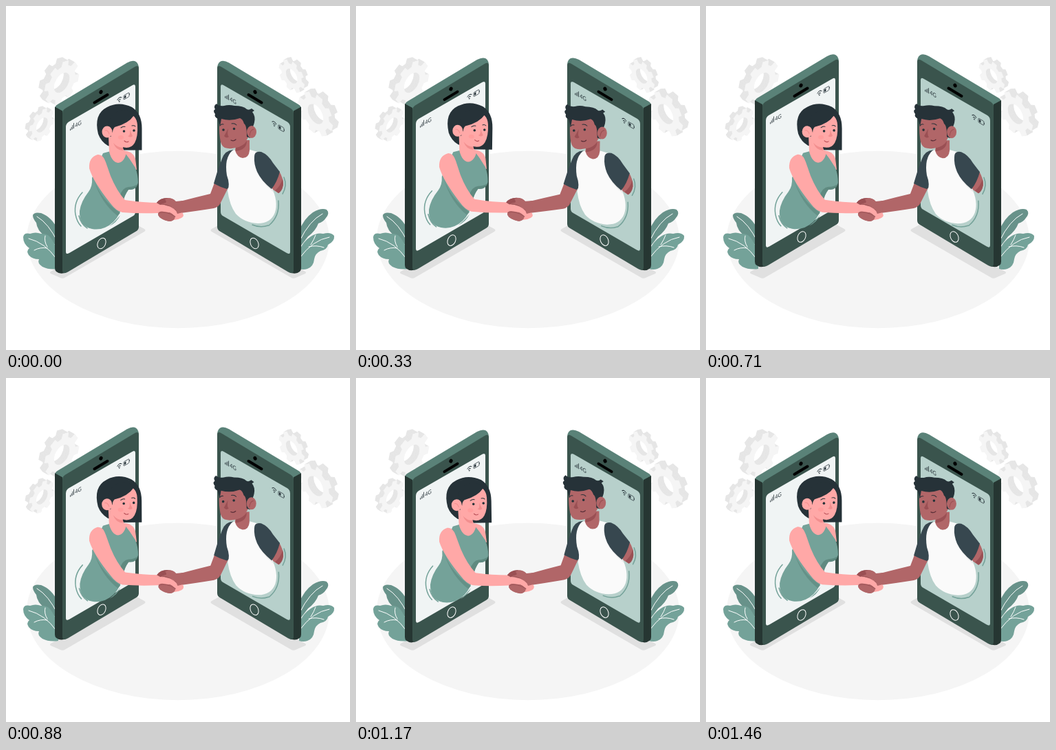
Write an HTML page that moves like this. It is 500x500 px and loops after 1.5 s.

```html
<!DOCTYPE html>
<html lang="en">
<head>
<meta charset="utf-8">
<title>Handshake through phones</title>
<style>
  html, body { margin: 0; width: 100%; height: 100%; overflow: hidden; background: #fff; }
  svg { display: block; width: 100vw; height: 100vh; }
  .teal { fill: #74a299; }
  .leafback { fill: #68928a; }
  .shade { fill: #5f8a80; }
  .dark { fill: #263238; }
  .sleeve { fill: #37474f; }
  .pink { fill: #ffa8a7; }
  .rose { fill: #f28f8f; }
  .brown { fill: #b16668; }
  .umber { fill: #9a5054; }
  .line { fill: none; stroke-linecap: round; stroke-linejoin: round; }
  .vein { stroke: #fff; stroke-width: 1; }
  .ink { stroke: #263238; stroke-width: 1; }
  .swoosh { stroke: #74a299; stroke-width: 1.5; }
</style>
</head>
<body>
<svg viewBox="0 0 500 500">
  <defs>
    <g id="phone">
      <path fill="#5a8278" d="M71 149Q71 145.500 75 143L176 82.500Q184 78 189 81Q193 84 193 91L82 157Z"/>
      <path fill="#263632" d="M71 146.500L82 152.500L88 387Q79 391 73 386Q71 384.500 71 381Z"/>
      <path fill="#3a544d" d="M82 156Q82 151.500 86 149L187 88.500Q193 85 193 91V321Q193 325 189 327.500L90 386.500Q82 391 82 384Z"/>
      <path class="line" stroke="#000" stroke-width="4" d="M128.500 140.500L147.500 129"/>
      <ellipse cx="138" cy="125" rx="2.500" ry="3" transform="rotate(25 138 125)"/>
      <ellipse cx="139" cy="345" rx="5.600" ry="8.200" transform="rotate(25 139 345)" fill="none" stroke="#fff"/>
    </g>
    <path id="screen" d="M87 176Q87 171 91 168.500L184 115Q188 113 188 117V299Q188 303 185 305L92 359Q87 362 87 357Z"/>
    <g id="status" class="dark">
      <path d="M0 0h.9v-2.500H0zM2 0h.9v-4H2zM4 0h.9v-6H4zM6 0h.9v-8H6z"/>
      <text x="8.500" y="0" font-size="8.300" font-family="Lato, sans-serif">4G</text>
      <path class="line ink" d="M79.500 -5Q83 -8.500 86.500 -5M81.300 -2.900Q83 -4.700 84.700 -2.900"/>
      <circle cx="83" cy="-.9" r=".9"/>
      <path d="M91.200 -4.800h2.800v3.600h-2.800zM99.500 -4h.9v2h-.9z"/>
      <rect x="90" y="-6" width="9.300" height="6" rx="1.300" fill="none" stroke="#263238" stroke-width=".7"/>
    </g>
    <path id="shadow" fill="#e0e0e0" d="M65 386L190 318L201 324Q204 326 201 328L86 394.500Q82 397 78 394.500L65 389Q63 387.500 65 386Z"/>
  </defs>

  <ellipse cx="250" cy="339.500" rx="220" ry="128.700" fill="#f5f5f5"/>
  <g id="gears"></g>
  <use href="#shadow"/>
  <use href="#shadow" transform="matrix(-1 0 0 1 500 0)"/>

  <path class="leafback" d="M39 304Q41 299 51 301Q67 307 75 325V349Q66 344 57 335Q45 326 44 315Q39 309 39 304Z"/>
  <path class="line vein" d="M45 306Q62 316 75 343"/>
  <path class="teal" d="M25 336Q26 329 35 331Q43 328 51 331Q62 330 67 340L76 356V382Q63 384 53 379Q45 374 48 368Q38 368 33 362Q29 356 34 352Q25 346 25 336Z"/>
  <path class="line vein" d="M33 338Q57 344 73 367M57 334Q55 342 60 350M41 355Q50 350 60 352"/>
  <path class="leafback" d="M426 327Q433 309 446 300Q458 293 466 296Q471 301 465 308Q461 314 454 316Q450 327 439 335L426 352Z"/>
  <path class="line vein" d="M460 302Q441 312 427 341"/>
  <path class="teal" d="M426 356Q432 342 443 335Q452 329 461 331Q472 328 477 334Q478 342 468 347Q467 354 457 356Q449 360 448 368Q447 379 438 382Q432 384 426 382Z"/>
  <path class="line vein" d="M470 336Q446 340 427 366M450 333Q448 339 443 347M462 351Q451 347 440 350"/>

  <g id="phones">
    <use href="#phone"/>
    <use href="#screen" fill="#f0f4f4"/>
    <use href="#status" transform="matrix(.866 -.5 0 1 93 181.300)"/>
    <g transform="matrix(-1 0 0 1 500 0)">
      <use href="#phone"/>
      <use href="#screen" fill="#b7d0cb"/>
    </g>
    <use href="#status" transform="matrix(.866 .5 0 1 318 133.500)"/>
  </g>

  <g id="people">
    <!-- woman -->
    <path class="line swoosh" d="M111 271Q98 285 101 303Q103 314 109 320M106 305Q109 317 118 323"/>
    <path class="dark" d="M134 186Q127 157 147 147Q164 138 183 147Q197.500 156 197.500 178V209.500H168L148 203Q138 197 134 186Z"/>
    <path class="pink" d="M170 210Q185 211 188 222L190 238L180 236Z"/>
    <path class="teal" d="M141 214L152 211L171 211Q180 222 188 235Q192 245 192 257Q190 267 178 267Q172 275 170 286Q167 303 156 314Q142 327 125 324Q106 320 107 298Q109 284 120 270Q126 262 125 250Z"/>
    <path class="shade" d="M191 259Q189 268 178 267Q172 275 170 285L165 277Q169 264 178 263Q186 263 191 259Z"/>
    <path class="shade" d="M128 254Q140 283 166 301L162 305Q139 287 128 254Z" opacity=".7"/>
    <path class="pink" d="M149 190H170V206Q171 211 175 213Q172 227 163 228Q154 227 150 212Z"/>
    <path class="rose" d="M156 199Q162 206 170 206V210Q160 210 156 199Z"/>
    <path class="pink" d="M151 176Q157 158 174 156Q190 157 191 173Q192 190 187 199Q183 206 175 206Q161 205 153 193Z"/>
    <path class="dark" d="M148 178Q149 154 170 151Q188 151 192 172Q190 164 186 159Q178 171 158 176Q155 179 155 184Z"/>
    <ellipse class="pink" cx="147" cy="183" rx="7.500" ry="8.500"/>
    <path class="line" stroke="#f28f8f" stroke-width="1" d="M144 181Q148 180 150 186"/>
    <circle class="dark" cx="171.500" cy="182" r="1.800"/>
    <circle class="dark" cx="186" cy="181" r="1.800"/>
    <path class="line ink" d="M167 177Q170 174.500 173 175.500M183 174Q186 173 188 175"/>
    <path class="rose" d="M180 180L184 189Q181 192 177 189Q181 189 180 180Z"/>
    <ellipse cx="167" cy="191" rx="4" ry="3" fill="#ff9e9d"/>
    <path class="line" stroke="#b95058" stroke-width="1.100" d="M172 196Q175 199 178 197"/>
    <path class="pink" d="M121 236Q120 220 133 216Q141 215 145 227L152 247Q161 269 173 282Q200 286 223 286Q230 278 240 280L255 299Q260 304 255 307L243 311L221 301Q193 302 169 300Q160 298 152 287Q127 256 121 236Z"/>
    <path class="teal" d="M166 304Q161 315 150 320Q158 314 166 304Z"/>

    <!-- man -->
    <path class="line swoosh" d="M404 249Q409 261 402 273M396 283Q398 306 382 319M358 318Q370 323 381 319"/>
    <path class="brown" d="M382 262L397 240Q403 250 403 260Q401 270 396 272Q389 268 382 262Z"/>
    <path class="umber" d="M391 268Q399 262 402 251Q405 266 396 272Z"/>
    <path class="brown" d="M303 257L297 273Q276 278 253 284L246 302Q277 298 302 294Q310 292 313 284L323 264Z"/>
    <path class="sleeve" d="M302 258Q307 239 314 222Q318 210 330 209L330 258L321 266Q311 263 302 258Z"/>
    <path fill="#fafafa" d="M329 210Q338 208 355 209L369 213L365 235L386 263Q396 284 391 300Q385 316 366 316Q346 315 334 302Q325 290 322 268Q326 260 321 246Q317 221 329 210Z"/>
    <path fill="#ebebeb" d="M363 236Q372 252 387 265L389 271Q370 256 363 236Z"/>
    <path class="sleeve" d="M361 219Q361 210 371 212Q381 216 388 228L398 241Q394 256 386 266Q371 254 365 241Q360 229 361 219Z"/>
    <path class="brown" d="M335 195H354V210Q353 221 344 221Q336 220 333 210Z"/>
    <path class="umber" d="M334 206Q345 204 350 196Q350 209 334 211Z"/>
    <path class="brown" d="M311 162Q325 154 350 160L355 184Q351 197 340 204Q327 209 318 206Q312 203 311 192Q309 178 311 162Z"/>
    <path class="dark" d="M308 164Q302 161 304 157Q300 152 304 150Q301 145 306 142Q309 146 317 145Q324 143 332 145Q345 145 350 150Q353 152 357 149L361 152L358 154Q363 160 361 169Q360 174 356 181L355 192L350 190Q350 173 346 171Q344 164 340 163Q326 168 313 164L311 175Z"/>
    <ellipse class="brown" cx="357" cy="183" rx="7" ry="9"/>
    <path class="line" stroke="#9a5054" stroke-width="1.100" d="M360 179Q355 180 354 188"/>
    <circle class="dark" cx="316" cy="180" r="1.800"/>
    <circle class="dark" cx="331.500" cy="178.500" r="1.800"/>
    <path class="line ink" d="M311 174Q313 171 316 172M328 171Q332 170 335 173"/>
    <path class="umber" d="M323 178L317 189Q320 193 324 190Q321 188 323 178Z"/>
    <path class="line" stroke="#5b2f38" stroke-width="1.200" d="M327 195Q331 197 334 194"/>

    <!-- clasped hands -->
    <path class="brown" d="M219 286Q224 279 235 279Q243 279 247 284L257 283V300L246 303Q247 311 239 313Q229 312 223 307Q219 301 224 298Q222 293 230 290Q224 289 219 286Z"/>
    <path class="pink" d="M221 289Q229 290 236 288Q246 293 249 299L256 300Q260 305 255 308Q250 311 244 311Q247 304 238 300L222 300Z"/>
    <path class="umber" d="M219 286Q224 279 234 279Q239 281 243 286Q231 284 224 289Z"/>
    <path class="brown" d="M231 281Q239 277 246 284L257 284V300L249 302Q247 294 238 291Q230 290 227 287Q236 287 231 281Z"/>
    <path class="brown" d="M221 304Q221 297 230 299Q241 300 246 306Q245 313 237 313Q226 311 221 304Z"/>
    <path class="line" stroke="#9a5054" stroke-width=".8" d="M222 301Q232 297 246 306M228 288Q240 290 247 297"/>
  </g>
</svg>
<script>
  const LOOP = 1500;
  const byId = id => document.getElementById(id);

  function gearPath(r) {
    const tooth = [[-.31, .78], [-.21, 1], [.21, 1], [.31, .78]];
    const points = [];
    for (let i = 0; i < 8; i++) {
      for (const [turn, reach] of tooth) {
        const a = (i + turn + .3) * Math.PI / 4;
        points.push([r * reach * Math.cos(a), r * reach * Math.sin(a)].map(v => v.toFixed(2)));
      }
    }
    const h = r * .46;
    return `M${points.join('L')}ZM${h} 0A${h} ${h} 0 1 0 ${-h} 0A${h} ${h} 0 1 0 ${h} 0Z`;
  }

  // side: 1 shows the thickness on the left, -1 on the right
  function gear(x, y, r, side) {
    const d = gearPath(r), depth = r * .3;
    let out = '';
    for (let k = depth; k > -.5; k -= .5) {
      const fill = k < .5 ? '#f5f5f5' : '#e6e6e6';
      out += `<path d="${d}" fill="${fill}" fill-rule="evenodd" transform="matrix(.866 ${-side * .5} 0 1 ${x - side * k} ${y - k * .577})"/>`;
    }
    return out;
  }

  byId('gears').innerHTML = gear(81, 111.5, 29, 1) + gear(52.5, 173, 21.5, 1)
    + gear(415, 102, 21.5, -1) + gear(450, 157, 29, -1);

  // triangle wave from -1 to 1, starting at 0 and rising
  const sway = p => p < .25 ? 4 * p : p < .75 ? 2 - 4 * p : 4 * p - 4;

  function draw() {
    const p = performance.now() % LOOP / LOOP;
    const lift = 10 * (1 - Math.abs(1 - 2 * p));
    byId('phones').setAttribute('transform', `translate(0 ${-lift})`);
    byId('people').setAttribute('transform', `rotate(${sway(p)} 254 233)`);
    requestAnimationFrame(draw);
  }
  draw();
</script>
</body>
</html>
```
